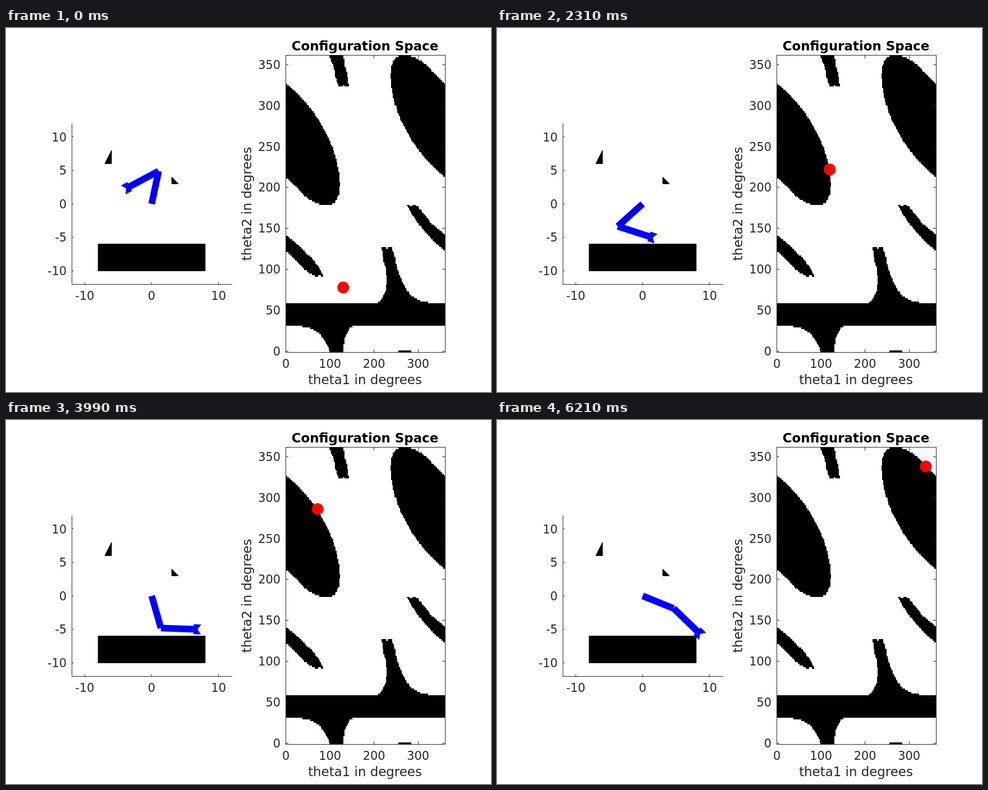
These frames come from a looping animation (864 px wide and 648 px high, 6240 ms). An HTML page:

```html
<!DOCTYPE html>
<html lang="en">
<head>
<meta charset="utf-8">
<title>Configuration Space</title>
<style>
  html, body { margin: 0; width: 100%; height: 100%; overflow: hidden; background: #fff; }
  svg { display: block; width: 864px; height: 648px; }
  text { font-family: "DejaVu Sans", sans-serif; font-size: 20.83px; fill: #262626; }
  .label { font-size: 22.9px; text-anchor: middle; }
  .title { font-weight: bold; fill: #000; }
  .axis { fill: none; stroke: #262626; shape-rendering: crispEdges; }
  .obstacle { stroke: #000; stroke-miterlimit: 10; }
</style>
</head>
<body>
<svg id="stage" viewBox="0 0 864 648"></svg>
<script>
const STEP_MS = 30, LOOP_MS = 6240, GRID = 2, N = 181;
const stage = document.getElementById('stage');

// Pixel mapping of the two plots
const world = { x0: 259.5, y0: 313.1, k: 11.92 };
const box = { left: 497.9, right: 781.9, top: 49, bottom: 577.1 };
const kx = (box.right - box.left) / 362, ky = (box.bottom - box.top) / 362;
const wx = x => world.x0 + x * world.k;
const wy = y => world.y0 - y * world.k;
const cx = t1 => box.left + (t1 + 1) * kx;
const cy = t2 => box.bottom - (t2 + 1) * ky;

function add(tag, attrs, text) {
  const el = document.createElementNS('http://www.w3.org/2000/svg', tag);
  for (const key in attrs) el.setAttribute(key, attrs[key]);
  if (text !== undefined) el.textContent = text;
  return stage.appendChild(el);
}
const polyPath = poly => 'M' + poly.map(([x, y]) => wx(x).toFixed(2) + ' ' + wy(y).toFixed(2)).join('L') + 'Z';

// Robot and obstacles as convex pieces
const link = [[0, -.5], [5, -.5], [5, .5], [0, .5]];
const claw = [[4.9, 0], [5.5, 0], [6, .75], [4.9, .75]];
const forearm = [link, claw, claw.map(([x, y]) => [x, -y]).reverse()];
const obstacles = [
  [[-8, -10], [8, -10], [8, -6], [-8, -6]],
  [[-7, 6], [-6, 6], [-6, 8]],
  [[3, 3], [4, 3], [3, 4]]
];

function place(poly, degrees, [ox, oy] = [0, 0]) {
  const a = degrees * Math.PI / 180, c = Math.cos(a), s = Math.sin(a);
  return poly.map(([x, y]) => [ox + x * c - y * s, oy + x * s + y * c]);
}
const elbowAt = t2 => place([[5, 0]], t2)[0];
const forearmAt = (t1, t2) => forearm.map(p => place(p, t1 + t2, elbowAt(t2)));

// Separating axis test; touching counts as a hit
function separatedBy(edges, a, b) {
  for (let i = 0; i < edges.length; i++) {
    const p = edges[i], q = edges[(i + 1) % edges.length];
    const nx = q[1] - p[1], ny = p[0] - q[0];
    let a0 = Infinity, a1 = -Infinity, b0 = Infinity, b1 = -Infinity;
    for (const [x, y] of a) { const d = x * nx + y * ny; a0 = Math.min(a0, d); a1 = Math.max(a1, d); }
    for (const [x, y] of b) { const d = x * nx + y * ny; b0 = Math.min(b0, d); b1 = Math.max(b1, d); }
    if (a1 < b0 - 1e-6 || b1 < a0 - 1e-6) return true;
  }
  return false;
}
const hits = poly => obstacles.some(o => !separatedBy(o, o, poly) && !separatedBy(poly, o, poly));

const blocked = Array.from({ length: N }, (_, row) => {
  const t2 = row * GRID, upperHit = hits(place(link, t2));
  return Array.from({ length: N }, (_, col) => upperHit || forearmAt(col * GRID, t2).some(hits));
});

// Grid walk that hugs the obstacle: turn left when free, otherwise go up
function findPath() {
  const goal = { col: 169, row: 169 }, path = [];
  let col = 65, row = 39, wrapped = false;
  while (path.length < LOOP_MS / STEP_MS) {
    path.push([col * GRID, row * GRID]);
    const next = (col + N - 1) % N;
    const mayTurn = (col > 62 || row > 99) && !(wrapped && col <= goal.col);
    if (mayTurn && (row === goal.row || !blocked[row][next])) {
      if (next > col) wrapped = true;
      col = next;
    } else if (row < goal.row) row++;
  }
  return path;
}
const path = findPath();

function drawSpace() {
  let d = '';
  blocked.forEach((line, row) => {
    const top = cy(row * GRID + 1).toFixed(2), bottom = cy(row * GRID - 1).toFixed(2);
    for (let c = 0; c < N; c++) {
      if (!line[c]) continue;
      const from = cx(c * GRID - 1).toFixed(2);
      while (c < N && line[c]) c++;
      d += `M${from} ${top}H${cx(c * GRID - 1).toFixed(2)}V${bottom}H${from}Z`;
    }
  });
  add('path', { d, 'shape-rendering': 'crispEdges' });
}

const half = v => Math.floor(v) + .5;

function drawAxes() {
  let d = 'M117.5 170V456.5H403';
  for (const v of [-10, 0, 10]) {
    d += `M${half(wx(v))} 456v-3`;
    add('text', { x: wx(v), y: 484, 'text-anchor': 'middle' }, v);
  }
  for (const v of [-10, -5, 0, 5, 10]) {
    d += `M117 ${half(wy(v))}h3`;
    add('text', { x: 108, y: Math.round(wy(v) + 7.6), 'text-anchor': 'end' }, v);
  }
  d += 'M498.5 48.5H782.5V577.5H498.5Z';
  for (const v of [0, 100, 200, 300]) {
    d += `M${half(cx(v))} 577v-5M${half(cx(v))} 49v5`;
    add('text', { x: cx(v), y: 605, 'text-anchor': 'middle' }, v);
  }
  for (let v = 0; v <= 350; v += 50) {
    d += `M498 ${half(cy(v))}h5M782 ${half(cy(v))}h-5`;
    add('text', { x: 489, y: Math.round(cy(v) + 7.6), 'text-anchor': 'end' }, v);
  }
  add('path', { d, class: 'axis' });
  add('text', { x: 639.5, y: 634, class: 'label' }, 'theta1 in degrees');
  add('text', { transform: 'translate(436.5 313) rotate(-90)', class: 'label' }, 'theta2 in degrees');
  add('text', { x: 639.5, y: 39.5, class: 'label title' }, 'Configuration Space');
}

drawSpace();
drawAxes();

// The floor is two triangles, which gives it the thin spikes at opposite corners
const [floor, ...triangles] = obstacles;
const faces = [[floor[0], floor[1], floor[2]], [floor[0], floor[2], floor[3]], ...triangles];
add('path', { d: faces.map(polyPath).join(''), class: 'obstacle' });

const arm = add('path', { fill: '#00f' });
const dot = add('circle', { r: 10.5, fill: '#f00' });

function render(ms) {
  const [t1, t2] = path[Math.floor((ms % LOOP_MS) / STEP_MS)];
  arm.setAttribute('d', [place(link, t2), ...forearmAt(t1, t2)].map(polyPath).join(''));
  dot.setAttribute('cx', cx(t1));
  dot.setAttribute('cy', cy(t2));
}

let start;
function tick(now) {
  if (start === undefined) start = now;
  render(Math.max(0, now - start));
  requestAnimationFrame(tick);
}
render(0);
requestAnimationFrame(tick);
</script>
</body>
</html>
```
